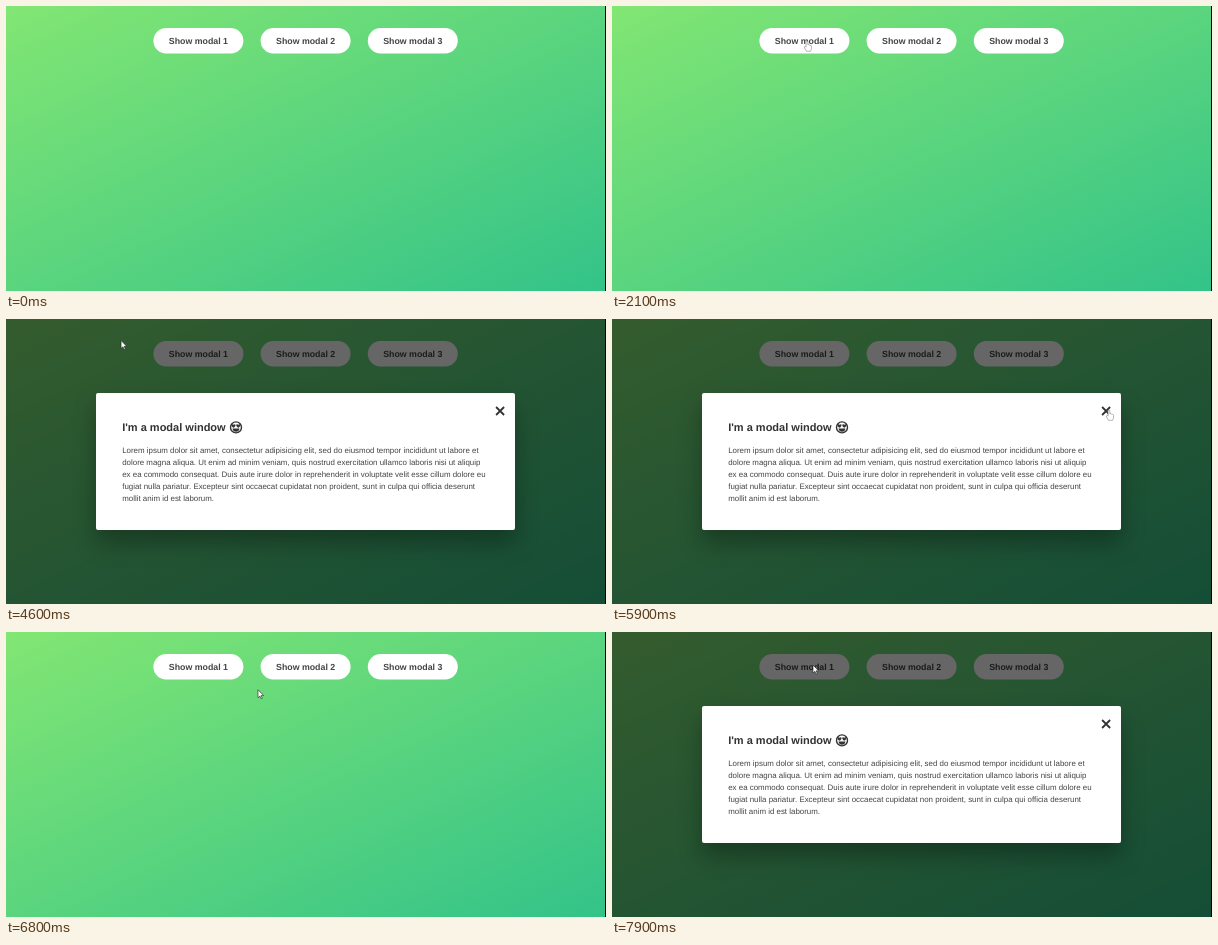
Animation of 600 by 285 pixels, one loop 8 s. Source, as an HTML page:

```html
<!DOCTYPE html>
<html lang="en">
<head>
<meta charset="utf-8">
<title>Modal window</title>
<style>
  html, body { margin: 0; width: 100%; height: 100%; overflow: hidden; }
  svg { display: block; width: 100%; height: 100%; }
  text {
    font-family: "Liberation Sans", Arial, sans-serif;
    font-size: 7.92px;
    fill: #444;
    text-rendering: geometricPrecision;
  }
  .label { font-size: 8.8px; font-weight: bold; text-anchor: middle; }
  .title { font-size: 11px; font-weight: bold; fill: #333; }
  .panel { fill: #fff; filter: drop-shadow(0 13.2px 11px rgba(0, 0, 0, .3)); }
</style>
</head>
<body>
<svg viewBox="0 0 600 285">
  <defs>
    <linearGradient id="green" x1="0" y1="0" x2="1" y2="1">
      <stop offset="0" stop-color="#82e673"/>
      <stop offset="1" stop-color="#33c389"/>
    </linearGradient>
  </defs>
  <rect width="600" height="285" fill="url(#green)"/>
  <g id="buttons"></g>

  <g id="modal">
    <rect width="600" height="285" opacity=".6"/>
    <rect class="panel" x="90" y="74" width="419" height="137" rx="2"/>
    <text class="title" x="116.2" y="112.2">I'm a modal window</text>
    <g transform="translate(230 108.4)" fill="#333">
      <circle r="5.5" fill="none" stroke="#333" stroke-width="1.4"/>
      <path id="heart" d="M-2.4 .3C-6.2 -2 -4 -4.4 -2.4 -2.7C-.8 -4.4 1 -2 -2.4 .3Z"/>
      <use href="#heart" x="4.8"/>
      <path d="M-3.5 1.2H3.5Q2.8 4.4 0 4.4T-3.5 1.2Z"/>
    </g>
    <g id="copy"></g>
    <path d="M490.1 88l8 8m0 -8l-8 8" stroke="#333" stroke-width="1.8"/>
  </g>

  <rect x="599" width="1" height="285"/>
  <g id="cursor" fill="#fff" stroke-linejoin="round">
    <path id="arrow" stroke="#222" stroke-width=".6"
      d="M0 0V8L1.9 6.3L3.1 9L4.3 8.5L3.1 5.8H5.6Z"/>
    <path id="hand" stroke="#777" stroke-width=".6" transform="scale(.9)"
      d="M-1 6.8V1Q-1 0 0 0T1 1V4.2Q2 3.6 2.6 4.5Q3.6 4.1 4 5Q5 5 5 6V8Q5 9.5 4 11.4H-.6L-2.8 7.6Q-3.2 6.2 -1.8 6Z"/>
  </g>
</svg>

<script>
const LOOP = 8000, STEP = 100;
const $ = id => document.getElementById(id);
const show = (el, on) => el.setAttribute("visibility", on ? "visible" : "hidden");

const buttonX = [0, 1, 2].map(i => 147.4 + i * 107.2);
$("buttons").innerHTML = buttonX.map((x, i) =>
  `<rect x="${x}" y="22" width="90" height="25.5" rx="12.75" fill="#fff"/>
   <text class="label" x="${x + 45}" y="37.6">Show modal ${i + 1}</text>`).join("");

$("copy").innerHTML = [
  "Lorem ipsum dolor sit amet, consectetur adipisicing elit, sed do eiusmod tempor incididunt ut labore et",
  "dolore magna aliqua. Ut enim ad minim veniam, quis nostrud exercitation ullamco laboris nisi ut aliquip",
  "ex ea commodo consequat. Duis aute irure dolor in reprehenderit in voluptate velit esse cillum dolore eu",
  "fugiat nulla pariatur. Excepteur sint occaecat cupidatat non proident, sunt in culpa qui officia deserunt",
  "mollit anim id est laborum."
].map((line, i) => `<text x="116.2" y="${134 + i * 11.88}">${line}</text>`).join("");

// Each move glides from the previous resting place; sag bends it downwards
const entry = { x: 542, y: 27 };
const moves = [
  { from: 300, to: 1100, x: 238, y: 84, sag: 90 },
  { from: 1100, to: 2100, x: 195, y: 35 },
  { from: 3800, to: 4700, x: 112, y: 21 },
  { from: 4700, to: 5700, x: 501, y: 90 },
  { from: 5700, to: 5900, x: 497, y: 91 },
  { from: 6200, to: 7000, x: 217, y: 53 },
  { from: 7000, to: 7300, x: 201, y: 33 }
];
const easeOut = u => 1 - (1 - u) ** 1.5;

function pointer(t) {
  let { x, y } = entry;
  for (const m of moves) {
    if (t < m.from) break;
    const u = easeOut(Math.min(1, (t - m.from) / (m.to - m.from)));
    x += (m.x - x) * u;
    y += (m.y - y) * u + (m.sag || 0) * Math.sin(Math.PI * u);
  }
  return { x, y };
}

function isClickable({ x, y }, open) {
  if (open) return x > 487 && x < 500 && y > 79 && y < 104;
  return y > 22 && y < 47.5 && buttonX.some(left => x > left && x < left + 90);
}

function draw(ms) {
  const t = Math.floor(ms % LOOP / STEP) * STEP;
  const open = t >= 3000 && t < 6200 || t >= 7900;
  const tip = pointer(t);
  const seen = t >= moves[0].from, over = isClickable(tip, open);
  show($("modal"), open);
  show($("arrow"), seen && !over);
  show($("hand"), seen && over);
  $("cursor").setAttribute("transform", `translate(${tip.x} ${tip.y})`);
}

let origin;
function tick(now) {
  origin ??= now;
  draw(now - origin);
  requestAnimationFrame(tick);
}
draw(0);
requestAnimationFrame(tick);
</script>
</body>
</html>
```
